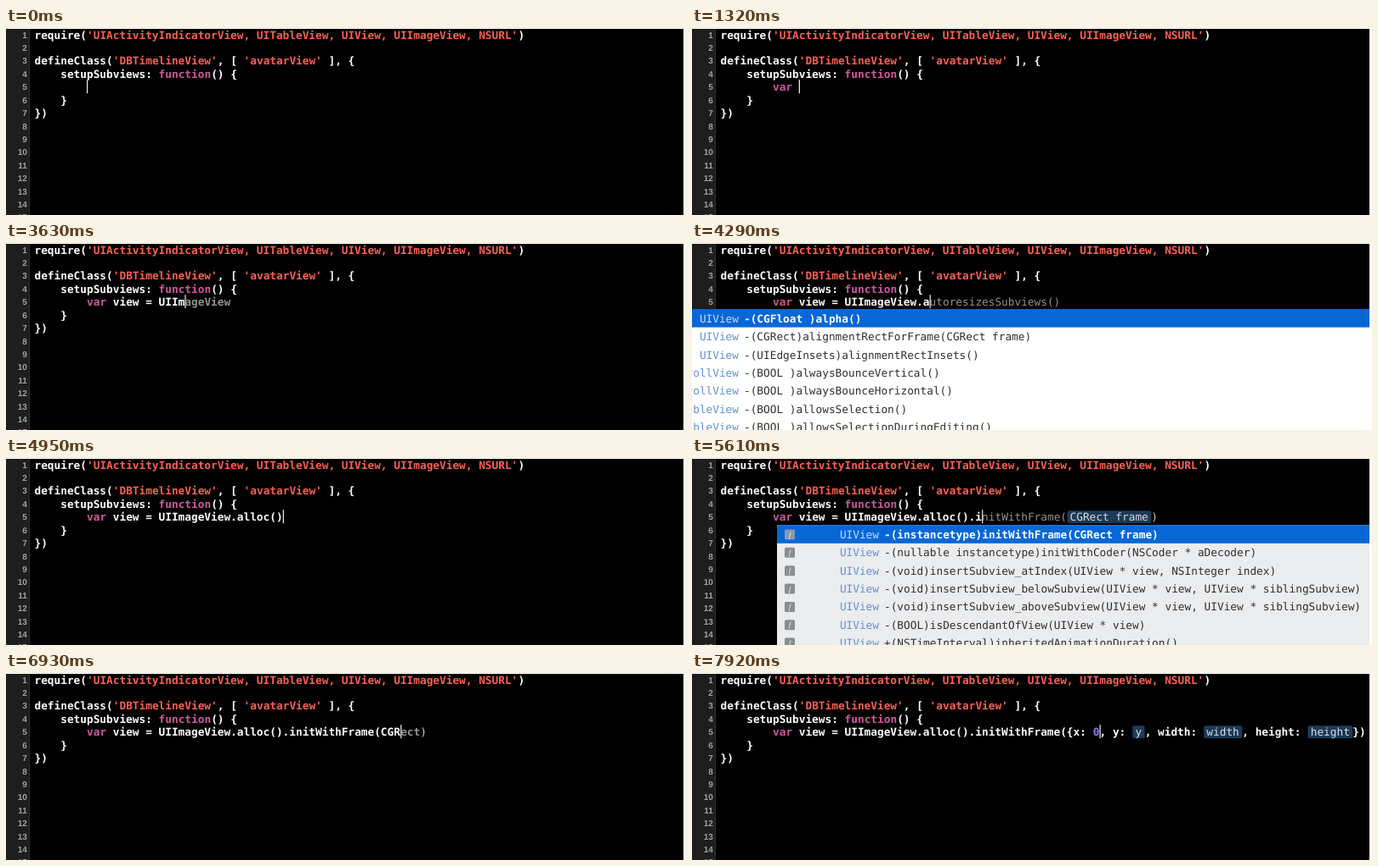
Recreate the animation shown at these times as an HTML page. Size 800 by 221 pixels, loop 8000 ms.

```html
<!DOCTYPE html>
<html lang="en">
<head>
<meta charset="utf-8">
<title>Code completion</title>
<style>
  html, body { margin: 0; width: 100%; height: 100%; overflow: hidden; background: #000; }
  svg { display: block; width: 800px; height: 221px; }
  text { font: 12.77px "DejaVu Sans Mono", "Liberation Mono", monospace; white-space: pre; text-rendering: geometricPrecision; }
  .plain, .string, .key, .num, .bold, .word { font-weight: bold; }
  .plain, .bold { fill: #fff; }
  .string { fill: #fb6052; }
  .key { fill: #cf589f; }
  .num { fill: #8480ee; }
  .word, .ghost { fill: #929292; }
  .end { fill: #c8c8c8; }
  .slot { fill: #d3dbe3; }
  .picked { fill: #10233c; }
  .item { fill: #303030; }
  .type { fill: #6391d6; }
  .pickedType { fill: #c5dcf8; }
  .number { font: bold 10px "Liberation Sans", Arial, sans-serif; fill: #a2a2a2; text-anchor: end; }
  .icon { font: italic 9px "Liberation Serif", serif; fill: #eee; text-anchor: middle; }
  .popup { filter: drop-shadow(0 3px 4px rgba(0, 0, 0, .5)); }
</style>
</head>
<body>
<svg id="stage" viewBox="0 0 800 221"></svg>
<script>
const LOOP = 8000, CHAR = 7.69, LEFT = 33.5, LINE = 15.42, ROW = 21.35;
const stage = document.getElementById('stage');

const rect = (x, y, w, h, fill, r = 0) =>
  `<rect x="${x}" y="${y}" width="${w}" height="${h}" rx="${r}" fill="${fill}"/>`;
const text = (x, y, cls, s, anchor = 'start') =>
  `<text x="${x}" y="${y}" class="${cls}" text-anchor="${anchor}">${s}</text>`;
const column = n => LEFT + n * CHAR;
const baseline = n => 12.5 + (n - 1) * LINE;

// Segments are [class, text]; a "caret" segment takes no room, slots are padded boxes.
const boxes = { slot: '#1d3a58', picked: '#568abf' };
function codeLine(n, indent, segments) {
  let x = column(indent), out = '';
  const y = baseline(n);
  for (const [cls, s = ''] of segments) {
    const width = s.length * CHAR;
    if (cls === 'caret') {
      out += rect(x, y - 13, 1.2, 16, '#f4f4f4');
    } else if (boxes[cls]) {
      out += rect(x + .3, y - 12, width + 6.6, 15, boxes[cls], 2) + text(x + 3.5, y, cls, s);
      x += width + 7;
    } else {
      out += text(x, y, cls, s);
      x += width;
    }
  }
  return out;
}

// Items are "type|signature"; the first one is selected.
function popup({ left, width, nameX, items, icon, top = 78.5, fill = '#fff' }) {
  let out = rect(left, top, width, ROW * items.length, fill) + rect(left, top, width, ROW + .3, '#0867d5');
  items.forEach((item, i) => {
    const [type, name] = item.split('|'), y = top + 15.8 + i * ROW;
    if (icon) {
      out += rect(left + 9, y - 10.5, 12, 12, i ? '#8a8d90' : '#8799ad', 1.5) + text(left + 15, y - 1.5, 'icon', icon, 'middle');
    }
    out += text(nameX - 6, y, i ? 'type' : 'pickedType', type, 'end') + text(nameX, y, i ? 'item' : 'bold', name);
  });
  return `<g class="popup">${out}</g>`;
}
const wordPopup = (col, items, icon, width = 322) =>
  popup({ left: column(col) - 92.5, width, nameX: column(col), items, icon });
const widePopup = items => popup({ left: -60, width: 900, nameX: 61, items, top: 78 });

const plain = s => ['plain', s], ghost = s => ['ghost', s], word = s => ['word', s], slot = s => ['slot', s];
const caret = ['caret'], keyword = ['key', 'var'];
const typed = (s, ...rest) => [keyword, plain(s), ...rest, caret];
const suggested = (s, ...rest) => [keyword, plain(s), caret, ...rest];
const frameGhost = s => [ghost(s), slot('CGRect frame'), ['end', ')']];
const image = ' view = UIImageView.', call = image + 'alloc().', frame = call + 'initWithFrame(';
const sizeSlots = [plain(', y: '), slot('y'), plain(', width: '), slot('width'), plain(', height: '), slot('height'), plain('})')];

const alphaItems = ['UIView|-(CGFloat )alpha()', 'UIView|-(CGRect)alignmentRectForFrame(CGRect frame)',
  'UIView|-(UIEdgeInsets)alignmentRectInsets()', 'UIScrollView|-(BOOL )alwaysBounceVertical()',
  'UIScrollView|-(BOOL )alwaysBounceHorizontal()', 'UITableView|-(BOOL )allowsSelection()',
  'UITableView|-(BOOL )allowsSelectionDuringEditing()'];
const allocItems = ['NSObject|+(instancetype)alloc()', ...alphaItems.slice(5),
  'UITableView|-(BOOL )allowsMultipleSelection()', 'UITableView|-(BOOL )allowsMultipleSelectionDuringEditing()',
  'NSObject|+(instancetype)allocWithZone(NSZone * zone)', 'UIView|-(CGRect)alignmentRectForFrame(CGRect frame)'];
const initItems = ['UIView|-(instancetype)initWithFrame(CGRect frame)',
  'UIView|-(nullable instancetype)initWithCoder(NSCoder * aDecoder)'];
const insertItems = ['UIView|-(void)insertSubview_atIndex(UIView * view, NSInteger index)',
  'UIView|-(void)insertSubview_belowSubview(UIView * view, UIView * siblingSubview)',
  'UIView|-(void)insertSubview_aboveSubview(UIView * view, UIView * siblingSubview)',
  'UIView|-(BOOL)isDescendantOfView(UIView * view)',
  'UIView|+(NSTimeInterval)inheritedAnimationDuration()'];
const imageItems = ['UIImageView|-(instancetype)initWithImage(UIImage * image)',
  'UIImageView|-(instancetype)initWithImage_highlightedImage(UIImage * image, UIImage * highlightedImage)',
  'UITableView|-(instancetype)initWithFrame_style(CGRect frame, UITableViewStyle style)',
  'NSURL|-(instancetype)initWithString(NSString * URLString)',
  'NSObject|-(instancetype)init()'];
const geometryItems = ['CGRect', 'CGSize', 'CGPoint', 'CGFloat', 'CGVector', 'CGAffineTransform', 'CGColor'];
const named = names => names.map(name => '|' + name);

// [start in ms, line 5, popup]
const steps = [
  [0, [caret]],
  [660, []],
  [990, [keyword, caret], wordPopup(8, named(['var', 'valueForKey']), 'f')],
  [1320, typed(' ')],
  [1980, typed(' view'), wordPopup(12, named(['view']), 'f')],
  [2310, typed(' view =')],
  [2640, typed(' view = ')],
  [2970, suggested(' view = UI', word('ActivityIndicatorView'))],
  [3300, suggested(' view = UIIm', word('ageView')), wordPopup(19, named(['UIImageView', 'UIImage', 'UIImagePickerController']), 'C')],
  [3630, suggested(' view = UIIm', word('ageView'))],
  [3960, typed(image)],
  [4290, suggested(image + 'a', ghost('utoresizesSubviews()')), widePopup(alphaItems)],
  [4620, suggested(image + 'all', ghost('oc()')), widePopup(allocItems)],
  [4950, typed(image + 'alloc()')],
  [5280, typed(call)],
  [5610, suggested(call + 'i', ...frameGhost('nitWithFrame(')),
    popup({ left: 100, width: 750, nameX: 226, items: [...initItems, ...insertItems], icon: 'f', top: 79.2, fill: '#ebecee' })],
  [5940, suggested(call + 'init', ...frameGhost('WithFrame(')), widePopup([...initItems, ...imageItems])],
  [6270, [keyword, plain(frame), ['picked', 'CGRect frame'], ['end', ')']]],
  [6600, suggested(frame + 'C', word('GRect'), ['end', ')']), wordPopup(53, named(geometryItems), 'T', 347)],
  [6930, suggested(frame + 'CGR', word('ect'), ['end', ')'])],
  [7260, [keyword, plain(frame + '{x: '), ['picked', 'x'], ...sizeSlots]],
  [7920, [keyword, plain(frame + '{x: '), ['num', '0'], caret, ...sizeSlots]],
];

const numbers = Array.from({ length: 15 }, (_, i) => text(24.8, baseline(i + 1) - .9, 'number', i + 1, 'end')).join('');
const backdrop = rect(0, 0, 800, 221, '#000') + rect(0, 0, 27, 221, '#1e1e1e') + rect(27, 0, 1, 221, '#303030') + numbers +
  codeLine(1, 0, [plain('require('), ['string', "'UIActivityIndicatorView, UITableView, UIView, UIImageView, NSURL'"], plain(')')]) +
  codeLine(3, 0, [plain('defineClass('), ['string', "'DBTimelineView'"], plain(', [ '), ['string', "'avatarView'"], plain(' ], {')]) +
  codeLine(4, 4, [plain('setupSubviews: '), ['key', 'function'], plain('() {')]) +
  codeLine(6, 4, [plain('}')]) + codeLine(7, 0, [plain('})')]);
const border = rect(797, 0, 3, 221, '#fff') + rect(0, 0, 800, 1, '#fff');
stage.innerHTML = backdrop + '<g id="live"></g>' + border;
const live = document.getElementById('live');

let shown;
const started = performance.now();
function draw(now) {
  const time = Math.max(0, now - started) % LOOP;
  const step = steps.findLast(([start]) => start <= time);
  if (step !== shown) {
    shown = step;
    live.innerHTML = codeLine(5, 8, step[1]) + (step[2] || '');
  }
  requestAnimationFrame(draw);
}
draw(started);
</script>
</body>
</html>
```
